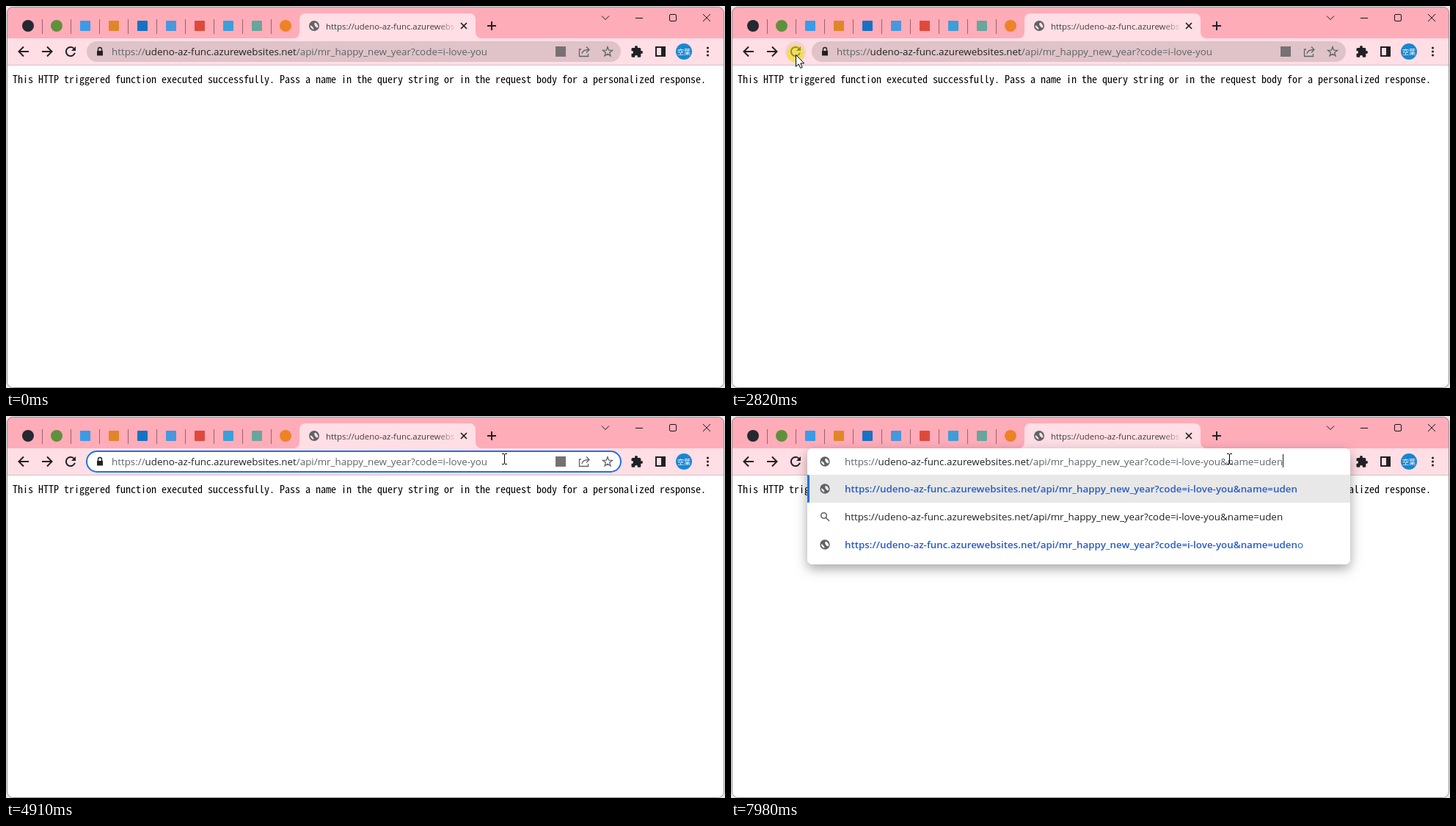
An HTML page with a canvas that plays this animation: 980 by 520 pixels, repeating every 8 s.

```html
<!DOCTYPE html>
<html lang="ja">
<head>
<meta charset="utf-8">
<style>
html, body { margin: 0; width: 100%; height: 100%; overflow: hidden; background: #e6e6e6; }
canvas { display: block; }
</style>
</head>
<body>
<canvas id="stage" width="980" height="520"></canvas>
<script>
const ctx = document.getElementById('stage').getContext('2d');
const LOOP = 8000, SAMPLE = 70;
const SCHEME = 'https://';
const HOST = 'udeno-az-func.azurewebsites.net';
const PATH = '/api/mr_happy_new_year?code=i-love-you';
const URL_TEXT = SCHEME + HOST + PATH;
const QUERY = '&name=udeno';
const BODY = 'This HTTP triggered function executed successfully. Pass a name in the query string ' +
  'or in the request body for a personalized response.';

const UI = '"Open Sans", "Noto Sans CJK JP", sans-serif';
const MONO = '"Noto Sans Mono CJK JP", "Noto Sans Mono", monospace';
ctx.font = `100px ${MONO}`;
// The page text has a 7 px advance
const monoSize = 700 / ctx.measureText('m').width;
const FONT = {
  url: `13.38px ${UI}`,
  bold: `600 13.38px ${UI}`,
  tab: `11.4px ${UI}`,
  avatar: '9px "Noto Sans CJK JP", sans-serif',
  page: `${monoSize}px ${MONO}`
};
const INK = '#202124', GREY = '#5f6368', BLUE = '#1a73e8', LINK = '#2a5cc4';
const TITLE_BAR = '#ffacb9', TOOLBAR = '#ffdee5', ROW = '#e8e8e8';

const T = {
  blur: 260, enter: 730, approach: 1500, reload: 1850, activate: 2130,
  leave: 3230, address: 4010, focus: 4430, caret: 4910, popup: 6250
};
const CLICKS = [T.activate, 2820, T.focus, 4970];
const LOADS = [2340, 2960];

const during = (t, starts, length) => starts.some(s => t >= s && t < s + length);
const clamp = (v, lo, hi) => Math.min(hi, Math.max(lo, v));

function rect(x, y, w, h, color) {
  ctx.fillStyle = color;
  ctx.fillRect(x, y, w, h);
}

function pill(x, y, w, h, r, color) {
  ctx.beginPath();
  ctx.roundRect(x, y, w, h, r);
  ctx.fillStyle = color;
  ctx.fill();
}

function ring(x, y, w, h, r, width, color) {
  ctx.beginPath();
  ctx.roundRect(x, y, w, h, r);
  ctx.strokeStyle = color;
  ctx.lineWidth = width;
  ctx.stroke();
}

function oval(x, y, rx, ry, turn, color) {
  ctx.beginPath();
  ctx.ellipse(x, y, rx, ry, turn, 0, 2 * Math.PI);
  ctx.fillStyle = color;
  ctx.fill();
}

const disc = (x, y, r, color) => oval(x, y, r, r, 0, color);

function arc(x, y, r, from, to, width, color) {
  ctx.beginPath();
  ctx.arc(x, y, r, from, to);
  ctx.strokeStyle = color;
  ctx.lineWidth = width;
  ctx.stroke();
}

function line(color, width, x, y, ...rest) {
  ctx.strokeStyle = color;
  ctx.lineWidth = width;
  ctx.beginPath();
  ctx.moveTo(x, y);
  for (let i = 0; i < rest.length; i += 2) ctx.lineTo(rest[i], rest[i + 1]);
  ctx.stroke();
}

function cross(x, y, r, width, color) {
  line(color, width, x - r, y - r, x + r, y + r);
  line(color, width, x + r, y - r, x - r, y + r);
}

// Draws text and returns its right edge
function text(s, x, y, font, color) {
  ctx.font = font;
  ctx.fillStyle = color;
  ctx.fillText(s, x, y);
  return x + ctx.measureText(s).width;
}

function globe(x, y, r, back) {
  disc(x, y, r, GREY);
  oval(x - .42 * r, y + .32 * r, .46 * r, .18 * r, .85, back);
  oval(x + .4 * r, y - .12 * r, .52 * r, .27 * r, 1, back);
}

function navArrow(x, dir) {
  line(INK, 2, x - dir * 7, 62, x + dir * 6, 62);
  line(INK, 2, x, 55.5, x + dir * 6.5, 62, x, 68.5);
}

function reloadIcon(x, y) {
  arc(x, y, 6.1, .29, 5.5, 2, INK);
  ctx.beginPath();
  ctx.moveTo(x + 7, y - 7);
  ctx.lineTo(x + 7, y - 1);
  ctx.lineTo(x + 1, y - 1);
  ctx.fillStyle = INK;
  ctx.fill();
}

function puzzleIcon(x, y) {
  pill(x - 7.5, y - 5, 12.8, 12.8, 1.5, INK);
  disc(x - 1, y - 6, 2, INK);
  disc(x + 6, y + 1, 2, INK);
  disc(x - 7, y + 1, 2, TOOLBAR);
  disc(x - 1, y + 7, 2, TOOLBAR);
}

function starIcon(x, y) {
  ctx.beginPath();
  for (let i = 0; i < 10; i++) {
    const r = i % 2 ? 2.8 : 6.8, a = i * Math.PI / 5 - Math.PI / 2;
    ctx.lineTo(x + r * Math.cos(a), y + r * Math.sin(a));
  }
  ctx.closePath();
  ctx.stroke();
}

function drawTabs(t) {
  rect(0, 0, 980, 44, TITLE_BAR);
  const icons = ['#24292f', '#5f913c', '#3b9be6', '#df8728', '#1672c4',
    '#4898de', '#df493c', '#3c9fd8', '#67a69c', '#ed8324'];
  icons.forEach((color, i) => {
    const x = 30 + 39 * i;
    if (i < 2 || i === 9) disc(x, 27, 8, color);
    else pill(x - 7, 20, 14, 14, 1, color);
    if (i < 9) rect(x + 19, 18, 1, 20, '#96646d');
  });

  ctx.beginPath();
  ctx.moveTo(392, 44);
  ctx.arcTo(400, 44, 400, 36, 8);
  ctx.arcTo(400, 10, 408, 10, 8);
  ctx.arcTo(640, 10, 640, 18, 8);
  ctx.arcTo(640, 44, 648, 44, 8);
  ctx.fillStyle = TOOLBAR;
  ctx.fill();

  if (during(t, LOADS, 2 * SAMPLE)) arc(420, 27, 6, t / 110, t / 110 + 4, 2, GREY);
  else globe(420, 27, 7, TOOLBAR);

  const fade = ctx.createLinearGradient(588, 0, 615, 0);
  fade.addColorStop(0, '#45393cff');
  fade.addColorStop(1, '#45393c00');
  text(SCHEME + HOST.slice(0, 23), 436, 32, FONT.tab, fade);
  cross(624, 27, 4, 1.7, INK);
  line(INK, 2, 656, 27, 668, 27);
  line(INK, 2, 662, 21, 662, 33);

  const control = t >= T.blur && t < T.activate ? '#a77f86' : '#1c1516';
  line(control, 1, 812, 13.5, 817, 18.5, 822, 13.5);
  line(control, 1, 858, 16.5, 868, 16.5);
  ring(904.5, 11.5, 9, 9, 1.5, 1, control);
  cross(955, 16, 5, 1, control);
}

function drawToolbar(t) {
  rect(0, 44, 980, 36, TOOLBAR);
  rect(0, 80, 980, 1, '#cfc4c6');
  navArrow(24, -1);
  navArrow(56, 1);
  if (t >= T.reload && t < T.leave + SAMPLE) disc(88, 62, 14, '#f5d0d5');
  reloadIcon(88, 62);
  puzzleIcon(860, 62);
  ring(886, 56, 12, 12, 0, 2, INK);
  rect(893, 56, 5, 12, INK);
  disc(924, 62, 11, '#1a86d0');
  ctx.textAlign = 'center';
  text('空葉', 924, 65.5, FONT.avatar, '#fff');
  ctx.textAlign = 'left';
  for (let y = 57; y <= 67; y += 5) disc(956.5, y, 1.6, INK);
}

function drawAddressIcons() {
  rect(124, 61, 8, 6.5, INK);
  ring(125.5, 56.5, 5, 7, 2.5, 1.4, INK);

  rect(749, 55, 14, 14, '#777174');
  line(GREY, 1.3, 784, 59, 781.5, 59, 781.5, 68.5, 793.5, 68.5, 793.5, 65);
  line(GREY, 1.3, 791, 55.5, 795, 59.5, 791, 63.5);
  ctx.beginPath();
  ctx.moveTo(785, 65);
  ctx.quadraticCurveTo(786, 59.5, 794, 59.5);
  ctx.stroke();
  starIcon(820, 62.5);
}

function drawUrl(x, tail, color) {
  x = text(SCHEME, x, 67, FONT.url, color || GREY);
  x = text(HOST, x, 67, FONT.url, color || INK);
  return text(PATH + tail, x, 67, FONT.url, color || GREY);
}

function drawCaret(x) {
  rect(Math.round(x), 52, 1, 18, INK);
}

function drawAddress(t) {
  const focused = t >= T.focus;
  pill(110, 48, 728, 28, 14, focused ? '#fff' : t >= T.address ? '#e9ccd2' : '#dfc3c8');
  if (focused) ring(110, 48, 728, 28, 14, 2, BLUE);
  drawAddressIcons();
  const selected = focused && t < T.caret;
  if (selected) {
    ctx.font = FONT.url;
    rect(144, 52, ctx.measureText(URL_TEXT).width, 19, '#0078d7');
  }
  const end = drawUrl(144, '', selected && '#fff');
  const blinkOn = Math.floor((t - 4970) / 530) % 2 === 0;
  if (t >= T.caret && blinkOn) drawCaret(end);
}

// Characters of one burst typed so far, one every 110 ms
const burst = (t, start, length) => clamp(Math.floor((t - start) / 110) + 1, 0, length);

const typedCount = t =>
  burst(t, T.popup, 1) + burst(t, 6650, 4) + burst(t, 7380, 1) + burst(t, 7650, 4);

function drawPopupShadow() {
  ctx.save();
  ctx.beginPath();
  ctx.rect(0, 0, 980, 520);
  ctx.roundRect(104, 44, 740, 158, 7);
  ctx.clip('evenodd');
  ctx.shadowColor = 'rgba(0,0,0,.35)';
  ctx.shadowBlur = 16;
  ctx.shadowOffsetY = 6;
  pill(104, 44, 740, 158, 7, '#fff');
  ctx.restore();
}

function drawSuggestions(t) {
  const count = typedCount(t);
  const typed = QUERY.slice(0, count);
  const opening = t < T.popup + SAMPLE;

  ctx.save();
  ctx.globalAlpha = opening ? 0.57 : 1;
  drawPopupShadow();
  pill(104, 44, 740, 158, 7, '#fff');
  rect(104, 80, 740, 38, ROW);
  pill(104, 80, 3, 38, [0, 2, 2, 0], BLUE);

  globe(128, 99, 6.7, ROW);
  text(URL_TEXT + typed, 155, 104, FONT.bold, LINK);

  arc(126.5, 135.5, 3.8, 0, 7, 1.6, GREY);
  line(GREY, 1.6, 129.2, 138.2, 134, 143);
  const end = text(URL_TEXT + typed, 155, 142, FONT.url, INK);
  if (count < QUERY.length - 1) text(' - Zuobel 検索', end, 142, FONT.url, '#74787d');

  globe(128, 175, 6.7, '#fff');
  const match = text(URL_TEXT + typed, 155, 180, FONT.bold, LINK);
  text(QUERY.slice(count), match, 180, FONT.url, LINK);
  ctx.restore();

  pill(110, 48, 728, 28, 14, '#fff');
  globe(128, 62, 6.7, '#fff');
  drawCaret(drawUrl(155, typed, opening && INK));
}

// Quadratic curve from a to c bent towards b, sampled like a screen recording
function glide(t, start, end, a, b, c) {
  const u = clamp(Math.floor((t - start) / SAMPLE) * SAMPLE / (end - start), 0, 1);
  const v = 1 - u;
  return a.map((p, i) => Math.round(v * v * p + 2 * u * v * b[i] + u * u * c[i]));
}

function pointerAt(t) {
  const low = [116, 131], button = [88, 66], field = [679, 58];
  if (t < T.approach) return glide(t, T.enter, T.approach, [509, 497], [178, 250], low);
  if (t < T.leave) return glide(t, T.approach, T.reload, low, [102, 98], button);
  return glide(t, T.leave, T.leave + 1120, button, [536, 98], field);
}

function drawBeam(x, y) {
  line('#000', 1, x + .5, y - 6, x + .5, y + 7);
  for (const edge of [y - 6.5, y + 7.5]) {
    line('#000', 1, x - 3, edge, x, edge);
    line('#000', 1, x + 1, edge, x + 4, edge);
  }
}

function drawArrow(x, y) {
  const shape = new Path2D('M.5 .5V16.5L4.2 13L6.7 18.5L9.2 17.5L6.8 12H11.7Z');
  ctx.save();
  ctx.translate(x, y);
  ctx.fillStyle = '#fff';
  ctx.fill(shape);
  ctx.strokeStyle = '#000';
  ctx.lineWidth = 1;
  ctx.stroke(shape);
  ctx.restore();
}

function drawPointer(t) {
  if (t < T.enter) return;
  const [x, y] = pointerAt(t);
  if (during(t, CLICKS, SAMPLE)) disc(x, y - 1, 12, 'rgba(240,230,20,.58)');
  if (t >= T.address) drawBeam(x, y);
  else drawArrow(x, y);
}

function draw(t) {
  rect(0, 0, 980, 520, '#e6e6e6');
  ctx.save();
  ctx.beginPath();
  ctx.roundRect(1, 1, 978, 519, 8);
  ctx.clip();
  rect(0, 0, 980, 520, '#fff');
  drawTabs(t);
  drawToolbar(t);
  text(BODY, 9, 105, FONT.page, '#000');
  if (t < T.popup) drawAddress(t);
  else drawSuggestions(t);
  ctx.restore();
  ring(1.5, 1.5, 977, 518, 8, 1, '#929092');
  drawPointer(t);
}

const start = performance.now();
function tick() {
  draw((performance.now() - start) % LOOP);
  requestAnimationFrame(tick);
}
tick();
</script>
</body>
</html>
```
